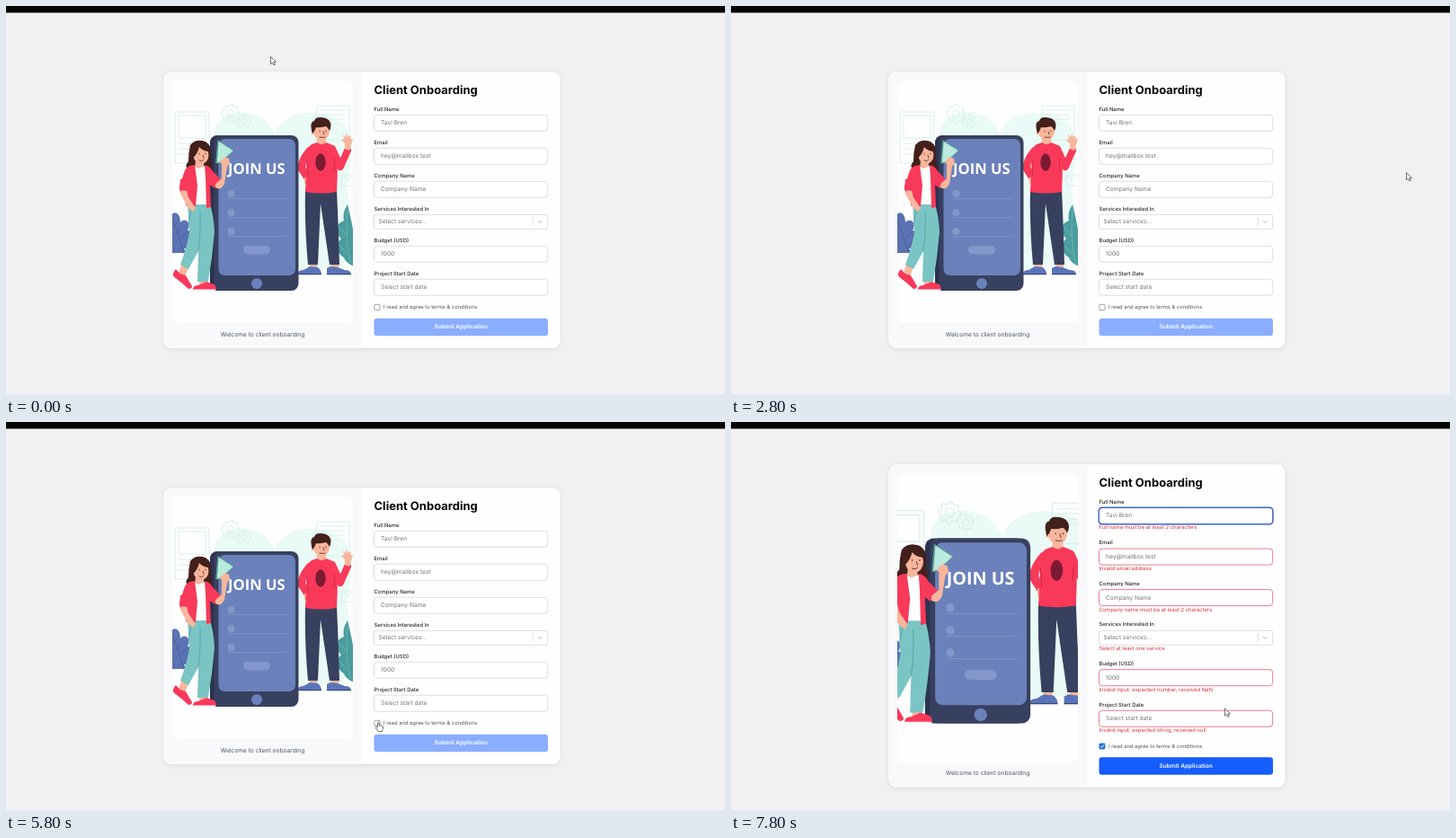
Animation, 800 px wide and 432 px high, one loop 8000 ms. Source, as an HTML page:

```html
<!DOCTYPE html>
<html lang="en">
<head>
<meta charset="utf-8">
<title>Client Onboarding</title>
<style>
  html, body { margin: 0; width: 100%; height: 100%; overflow: hidden; background: #f1f1f3; }
  svg { display: block; width: 100%; height: 100%; }
  text { font-family: Inter, sans-serif; font-size: 6.65px; dominant-baseline: central; text-rendering: geometricPrecision; }
  .title { font-size: 13px; font-weight: 700; fill: #09090b; }
  .label { font-size: 5.92px; font-weight: 500; fill: #27272a; }
  .hint { fill: #75757c; }
  .small { font-size: 5.8px; fill: #4b5563; }
  .error { font-size: 5.88px; fill: #dc2f3c; }
  .action { font-size: 6.5px; font-weight: 600; fill: #fff; }
  .field { fill: #fff; stroke: #cfcfd4; stroke-width: .7; }
  .error, .ring, .tick { visibility: hidden; }
  .invalid .error, .invalid .ring { visibility: visible; }
  .invalid .required { stroke: #e0485a; }
  .checked .tick { visibility: visible; }
  .checked .box { fill: #1a70cf; stroke: #1a70cf; }
  .checked .box.hover { fill: #0b55a4; stroke: #0b55a4; }
  .submit { fill: #8aadfe; }
  .checked .submit { fill: #155dfc; }
  .checked .submit.hover { fill: #1447e6; }
  .join { font: 700 16.6px "Open Sans", sans-serif; fill: #fff; dominant-baseline: alphabetic; }
  .line { fill: none; stroke-linecap: round; stroke-linejoin: round; }
  .sketch { fill: none; stroke: #d3eee7; stroke-width: .9; }
  .skin { fill: #f8b69c; }
  .red { fill: #f8395a; }
  .navy { fill: #38405f; }
  .blue { fill: #6b81bb; }
  .pale { fill: #8497ca; }
  .hair { fill: #42201c; }
</style>
</head>
<body>
<svg id="stage" viewBox="0 0 800 432" preserveAspectRatio="none">
  <defs>
    <filter id="shadow" x="-10%" y="-10%" width="120%" height="120%">
      <feDropShadow dx="0" dy="1" stdDeviation="2.5" flood-color="#000" flood-opacity=".1"/>
    </filter>
    <clipPath id="pictureClip"><rect x="185" y="83" width="201" height="270" rx="6" class="picture"/></clipPath>
    <clipPath id="cardClip"><rect x="175.5" y="73" width="441" height="308" rx="9" class="card"/></clipPath>
  </defs>
  <rect width="800" height="432" fill="#f1f1f3"/>
  <rect width="800" height="7.5" fill="#050505"/>
  <rect class="card" x="175.5" y="73" width="441" height="308" rx="9" fill="#fefefe" filter="url(#shadow)"/>
  <rect x="175" y="40" width="221" height="375" fill="#f9f9fb" clip-path="url(#cardClip)"/>
  <rect class="picture" x="185" y="83" width="201" height="270" rx="6" fill="#fefefe"/>

  <g clip-path="url(#pictureClip)"><g id="art">
    <path fill="#eafaf6" d="M232 190V142C235 111 285 109 299 142C309 114 355 112 377 132C386 150 386 180 378 200C387 240 386 280 372 292H310V190Z"/>
    <g class="sketch">
      <path d="M188 118h38v57h-38zM192 122h30v25h-30zM192 153h30M192 159h30M192 165h22M346 111h36v38h-36zM351 116h26M351 121h26M351 126h26M351 131h18M373 188h14v12h-14zl7 6 7-6"/>
      <g id="gears"></g>
    </g>
    <path fill="#5b73b3" d="M184 232c7-5 10 2 10 9c5-6 13 0 8 9c7 0 7 8 0 10c8 1 4 10-4 10l3 5h-17z"/>
    <path class="line" stroke="#425894" stroke-width=".7" d="M185 238q6 15 13 37M195 259l7-8M198 266l7-5"/>
    <path fill="#4b9d9f" d="M380 221q-6 9-4 18q-7 2-8 10q1 7 5 10q-6 5-4 13q3 6 7 8q2 6 11 10v-36q-3-18-7-33z"/>
    <path class="line" stroke="#79bbb9" stroke-width=".7" d="M380 226q-3 30 3 60M371 246l8 10M371 267l9 9"/>

    <g id="man">
      <path class="skin" d="M338 286h8v8h-8zM362 286h8v8h-8zM346 145h10v11q-5 4-10 0z"/>
      <path fill="#5a74b9" d="M324 299q1-5 7-5l7-4 9 1q4 3 4 8zM357 299v-7l4-2 8 1 8 3q7 0 7 5z"/>
      <path stroke="#303958" stroke-width=".9" d="M324 298.7h27M357 298.7h27"/>
      <path class="navy" d="M333 204h35q2 45 3 84h-11l-10-68-3 68h-11q-4-43-3-84z"/>
      <path class="line" stroke="#f8395a" stroke-width="8.5" d="M338 161q-10 12-9 20l7 11"/>
      <path class="skin" d="M332 191l6-1 3 6-5 5-4-4z"/>
      <path class="line" stroke="#f8395a" stroke-width="8" d="M363 159l9 20 8-18"/>
      <path class="skin" d="M377 159l0-6-4-4 3-1-1-5 3 3 1-4 2 4 3-2-1 4 3 0-2 7-2 6z"/>
      <path class="red" d="M340 154l6-2q5 4 10 0q8 2 11 7q3 10 1 48q-18 3-35 0l2-42q0-8 5-11z"/>
      <path class="line" stroke="#c71f43" stroke-width=".7" d="M335 172l1 18M366 170l-1 13"/>
      <ellipse cx="350" cy="174" rx="5.7" ry="9.7" fill="#7c1a34"/>
      <ellipse class="skin" cx="351" cy="139" rx="9" ry="10.5"/>
      <circle class="skin" cx="342" cy="141" r="2.3"/>
      <path class="hair" d="M341 142q-4-13 2-14q1-4 6-4q8 0 11 4q3 5 0 11q-2-4-4-5q-8 2-11 1q-1 4-4 7z"/>
      <path class="line" stroke="#5c2923" stroke-width=".8" d="M349 139v1M356 139v1M353 140l1 3M349 146q3 1 6 0"/>
    </g>

    <rect x="227" y="144" width="94" height="173" rx="8" fill="#2b3350"/>
    <rect class="navy" x="231.5" y="144" width="94" height="173" rx="8"/>
    <rect class="blue" x="236.5" y="148" width="85.5" height="152" rx="7"/>
    <circle class="blue" cx="279" cy="309" r="6"/>
    <text class="join" x="247" y="187">JOIN US</text>
    <g id="listRows" class="pale"></g>
    <rect class="pale" x="264" y="267" width="30" height="9.3" rx="4.6"/>

    <g id="woman">
      <path class="hair" d="M205 155q6-8 17-4q8 5 6 16l2 16q-12 7-25-1q-8-2-2-9q0-10 2-18z"/>
      <path class="skin" d="M195 288l8 3-4 10-7-3zM215 302h9v9h-9zM211 172h9v9l-5 5-5-5z"/>
      <path class="red" d="M189 293l5 5 6 2 7 12q0 3-4 3l-9-8-7-5q-3-4 2-9zM208 316q0-5 6-5l9-4 9 3q2 3 2 6z"/>
      <path class="line" stroke="#fff" stroke-width="1" d="M187 302l15 13M209 316h24"/>
      <path fill="#7bc4c4" d="M202 218h24q5 13 6 33q-2 27-7 56h-12l1-34-11 20-9-5q7-19 10-35z"/>
      <path class="line" stroke="#50a2a5" stroke-width=".8" d="M216 229q1 25-2 43M206 227l-3 16"/>
      <path fill="#fefefe" d="M209 178l5 3 7-3 5 10-1 33h-15z"/>
      <path class="red" d="M210 177q-8 0-11 6l-6 18q0 8 8 15l-1 6q6 3 11 1l2-23z"/>
      <path class="skin" d="M196 204l-2 5 9 16 5 4 3-4-8-12-2-8z"/>
      <path class="red" d="M194 193l11-2-1 15-11-1zM221 177q6 1 9 7l9 9-7 10-5-4 1 25-5 1-1-34z"/>
      <path class="skin" d="M233 198l7-6 0-16 3-7 5 1 1 5-3 4-3 19q-4 8-10 4z"/>
      <ellipse class="skin" cx="217" cy="166" rx="8.5" ry="10"/>
      <path class="hair" d="M207 165q0-12 10-12q9 1 10 9q-8 0-12-5q-2 8-7 12z"/>
      <path class="line" stroke="#5c2923" stroke-width=".8" d="M215 164v1M222 164v1M219 166l1 3M215 172q3 2 5-1"/>
    </g>
    <path fill="#b9eadb" stroke="#5ba797" stroke-width=".8" d="M236 150l17 11-14 13-5 1z"/>
    <path class="line" stroke="#4f988d" stroke-width="1.4" d="M236 150l-2 25"/>
    <path class="skin" d="M238 173l5-5 5 2-1 6-5 3z"/>
  </g></g>

  <text id="welcome" x="285.5" y="365.5" text-anchor="middle" fill="#4b5563">Welcome to client onboarding</text>
  <g id="form"></g>
  <g id="cursor" fill="#fff" stroke="#333" stroke-width=".7" stroke-linejoin="round">
    <path id="arrow" d="M.5.5v8.2l2-1.8 1.4 3 1.5-.7-1.4-2.9h2.5z"/>
    <path id="hand" d="M-.4 5.6V.8q.8-1.4 1.6 0v3l1.4.1 1.5.5 1.3.6v2.5l-.9 3H.3L-2.6 6.8q.2-1.6 1.2-1z"/>
  </g>
</svg>
<script>
const $ = id => document.getElementById(id);
const LOOP = 8000, STEP = 200, CHECK_AT = 6200, INVALID_AT = 7400;
const LIFT = 25.7, ERROR_GAP = 8.55, PICTURE_HEIGHT = 270;

// label position, label, placeholder, validation message
const fields = [
  [115, "Full Name", "Tavi Bren", "Full name must be at least 2 characters"],
  [152, "Email", "hey@mailbox.test", "Invalid email address"],
  [189, "Company Name", "Company Name", "Company name must be at least 2 characters"],
  [226, "Services Interested In", "Select services...", "Select at least one service"],
  [261, "Budget (USD)", "1000", "Invalid input: expected number, received NaN"],
  [298, "Project Start Date", "Select start date", "Invalid input: expected string, received null"]
];

const text = (cls, x, y, value, extra = "") => `<text class="${cls}" x="${x}" y="${y}" ${extra}>${value}</text>`;

function fieldMarkup([, label, hint, error], i) {
  const select = i === 3;
  const input = select
    ? `<rect class="field" x="409.5" y="6.3" width="193.2" height="16" rx="1.6"/>
       <path d="M586.5 9.5v9.5" stroke="#ccc" stroke-width=".6"/>
       <path class="line" d="M592 13.3l2.2 2.2 2.2-2.2" stroke="#aaa" stroke-width=".9"/>`
    : `<rect class="field required" x="409.5" y="6.2" width="193.2" height="18" rx="3.4"/>`;
  const ring = i ? "" : `<rect class="ring" x="409.2" y="5.9" width="193.8" height="18.6" rx="3.7" fill="none" stroke="#3d66d2" stroke-width="1.4"/>`;
  return text("label", 409.5, 0, label) + input + ring +
    text("hint", select ? 414.5 : 417, select ? 14.2 : 15.2, hint) +
    text("error", 409.5, select ? 27 : 28.7, error);
}

const rows = [
  [94, text("title", 409.5, 0, "Client Onboarding")],
  ...fields.map((field, i) => [field[0], fieldMarkup(field, i)]),
  [335.5, `<rect class="box" id="box" x="409.9" y="-3.2" width="6.2" height="6.2" rx="1" fill="#fff" stroke="#777" stroke-width=".7"/>
    <path class="tick line" d="M411.3 0l1.3 1.4 2.3-3" stroke="#fff" stroke-width="1"/>` +
    text("small", 420, 0, "I read and agree to terms &amp; conditions")],
  [357.5, `<rect class="submit" id="submit" x="409.5" y="-9.8" width="193.5" height="19.5" rx="3.2"/>` +
    text("action", 506.2, -.2, "Submit Application", 'text-anchor="middle"')]
];
$("form").innerHTML = rows.map(([, markup]) => `<g>${markup}</g>`).join("");

$("listRows").innerHTML = [209, 230, 251].map(y =>
  `<circle cx="250.5" cy="${y}" r="4"/><path d="M247 ${y + 5.5}h66" stroke="#8497ca" stroke-width=".8"/>`).join("");

function gear(cx, cy, radius) {
  const points = Array.from({ length: 32 }, (_, i) => {
    const a = i * Math.PI / 16, r = radius * (i % 4 < 2 ? 1 : .78);
    return `${cx + r * Math.cos(a)},${cy + r * Math.sin(a)}`;
  });
  return `<polygon points="${points.join(" ")}"/><circle cx="${cx}" cy="${cy}" r="${radius * .4}"/>`;
}
$("gears").innerHTML = gear(250, 120, 10.5) + gear(265, 129, 7.8);

// time, x, y of the pointer tip
const path = [
  [0, 294, 56], [1200, 748, 197], [1800, 749, 190], [2800, 751, 185], [3600, 753, 184],
  [4800, 511.5, 218], [5800, 414, 334], [6400, 416.5, 335], [7200, 512.5, 360],
  [7400, 514, 360], [7800, 549, 318.5], [8000, 549, 318.5]
];

function pointerAt(t) {
  const i = path.findIndex(key => key[0] > t);
  const [t0, x0, y0] = path[i - 1], [t1, x1, y1] = path[i];
  const u = (t - t0) / (t1 - t0), k = u * u * (3 - 2 * u);
  return [x0 + (x1 - x0) * k, y0 + (y1 - y0) * k];
}

// Every error message pushes down what follows; the centred card grows both ways.
function layout(invalid) {
  const lift = invalid ? LIFT : 0, gap = invalid ? ERROR_GAP : 0;
  [...$("form").children].forEach((row, i) => {
    const errorsAbove = Math.min(fields.length, Math.max(0, i - 1));
    row.setAttribute("transform", `translate(0 ${rows[i][0] - lift + gap * errorsAbove})`);
  });
  const stretch = (selector, y, height) => document.querySelectorAll(selector).forEach(el => {
    el.setAttribute("y", y - lift);
    el.setAttribute("height", height + 2 * lift);
  });
  stretch(".card", 73, 308);
  stretch(".picture", 83, PICTURE_HEIGHT);
  $("welcome").setAttribute("y", 365.5 + lift);
  const zoom = 1 + 2 * lift / PICTURE_HEIGHT;
  $("art").setAttribute("transform", `translate(285.5 220) scale(${zoom}) translate(-285.5 -220)`);
}

function render(now) {
  const t = Math.floor(now % LOOP / STEP) * STEP;
  const invalid = t >= INVALID_AT, checked = t >= CHECK_AT;
  const [x, y] = pointerAt(t);
  const inside = (left, right, top, bottom) => x > left && x < right && y > top && y < bottom;
  const overBox = !invalid && inside(408, 417.5, 331, 340);
  const overSubmit = checked && (invalid ? inside(409, 603, 373, 393) : inside(409, 603, 348, 367));

  layout(invalid);
  $("stage").classList.toggle("invalid", invalid);
  $("stage").classList.toggle("checked", checked);
  $("box").classList.toggle("hover", overBox);
  $("submit").classList.toggle("hover", overSubmit);
  const hand = overBox || overSubmit;
  $("hand").style.display = hand ? "" : "none";
  $("arrow").style.display = hand ? "none" : "";
  $("cursor").setAttribute("transform", `translate(${x} ${y})`);
}

const start = performance.now();
(function tick() {
  render(performance.now() - start);
  requestAnimationFrame(tick);
})();
</script>
</body>
</html>
```
